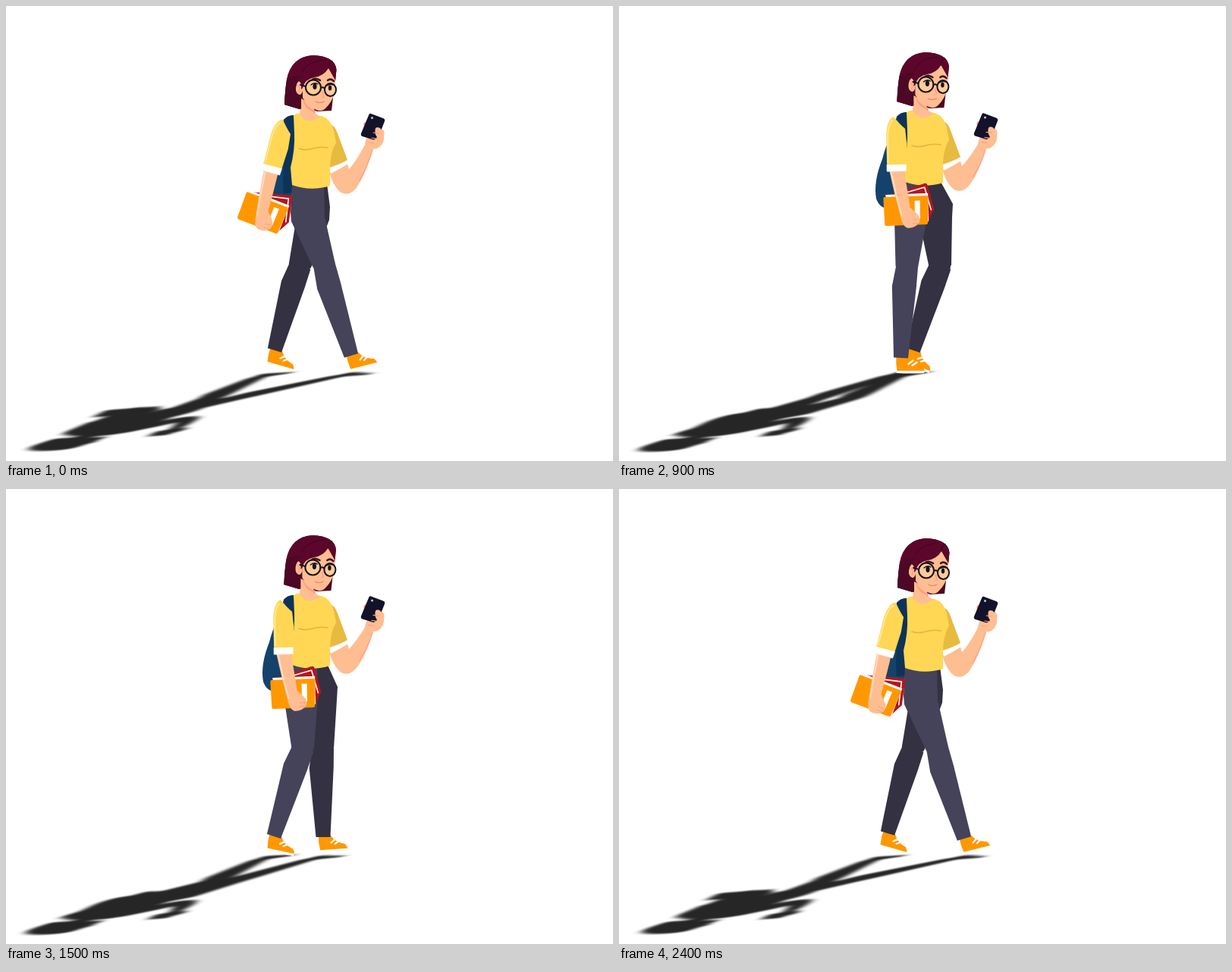
Recreate the animation shown at these times as an HTML page with a canvas. Size 800x600 px, loop 2500 ms.

```html
<!DOCTYPE html>
<html lang="en">
<head>
<meta charset="utf-8">
<title>Walking student</title>
<style>
html, body { margin: 0; width: 100%; height: 100%; overflow: hidden; background: #fff; }
canvas { display: block; }
</style>
</head>
<body>
<canvas id="stage" width="800" height="600"></canvas>
<script>
const stage = document.getElementById('stage').getContext('2d');
const layer = () => {
  const c = document.createElement('canvas');
  c.width = 800;
  c.height = 600;
  return c.getContext('2d');
};
const body = layer(), shade = layer();
const g = body;

const STEP = 100, FRAMES = 25, CYCLE = 2400;
const SKIN = '#ffbe91', BLUSH = '#ff9d85', SHIRT = '#ffd754', ORANGE = '#ff9800';
const NEAR = '#454359', FAR = '#343143', INK = '#17131d';

// time, hip x, knee x, knee y, ankle x, ankle y, foot tilt in degrees
const nearKeys = [
  [0, 399, 419, 342, 455, 461, -14],
  [500, 391, 396, 344, 403.5, 461, -1],
  [900, 386, 379, 344, 371.5, 464, 0],
  [1100, 380, 367, 346, 348.5, 464, 1],
  [1500, 390, 391, 342, 353, 458, 12],
  [1800, 394, 413, 341, 340, 428, 43],
  [2100, 400, 418, 342, 407.5, 462, 4],
  [2400, 399, 419, 342, 455, 461, -14]
];
const farKeys = [
  [0, 405, 387, 343, 354, 454, 16],
  [500, 417, 421, 340, 343.5, 425, 43],
  [900, 418, 423, 343, 387.5, 454, 22],
  [1100, 418, 425, 344, 429, 461, -12],
  [1200, 418, 425, 344, 440, 461, -13],
  [1500, 415, 417, 342, 418, 459, -4],
  [2100, 409, 389, 342, 376, 456, 10],
  [2400, 405, 387, 343, 354, 454, 16]
];

const rad = d => d * Math.PI / 180;
const mix = (a, b, k) => a + (b - a) * k;

function pose(keys, t) {
  let i = 1;
  while (keys[i][0] < t) i++;
  const a = keys[i - 1], b = keys[i];
  const k = (t - a[0]) / (b[0] - a[0]);
  return a.map((v, n) => mix(v, b[n], k)).slice(1);
}

function shape(color, d) {
  g.fillStyle = color;
  g.fill(new Path2D(d));
}

function line(color, width, d) {
  g.strokeStyle = color;
  g.lineWidth = width;
  g.stroke(new Path2D(d));
}

function oval(color, x, y, rx, ry, turn = 0) {
  g.fillStyle = color;
  g.beginPath();
  g.ellipse(x, y, rx, ry, turn, 0, 7);
  g.fill();
}

function group(x, y, deg, draw) {
  g.save();
  g.translate(x, y);
  g.rotate(rad(deg));
  draw();
  g.restore();
}

function shoe(x, y, tilt) {
  group(x, y, tilt, () => {
    shape('#fff', 'M-5 16H31V20Q14 21-6 20Z');
    shape(ORANGE, 'M-6-3L9-3L14 4Q20 9 28 11Q31 14 31 17L-5 17Q-7 7-6-3Z');
    line('#fff', 2.2, 'M10 8L16 3.5M15 10L21 6');
  });
}

function leg([hx, kx, ky, ax, ay, tilt], lift, color, near) {
  shoe(ax, ay, tilt);
  const hy = 250 - lift;
  // point along a limb, pushed sideways (positive is forward)
  const along = (x0, y0, x1, y1) => (k, w) => {
    const len = Math.hypot(x1 - x0, y1 - y0);
    const x = mix(x0, x1, k) + (y1 - y0) / len * w;
    const y = mix(y0, y1, k) - (x1 - x0) / len * w;
    return `${x} ${y}`;
  };
  const thigh = along(hx, hy, kx, ky), shin = along(kx, ky, ax, ay);
  const waist = near ? `M377 ${hy - 16}L${hx + 20} ${hy - 16}` : `M395 ${hy - 16}L423 ${hy - 16}`;
  const hip = near
    ? `L${hx + 21} ${hy + 28}`
    : `L${hx + 22} ${hy + 15}L${hx + 21} ${hy + 32}`;
  shape(color, `${waist}${hip}L${thigh(1, 15)}L${thigh(1, -14.5)}L${hx - 23} ${hy + 34}L${hx - 24} ${hy + 22}Z`);
  oval(color, kx, ky, 14, 14);
  shape(color, `M${shin(0, 15)}L${shin(0.22, 14.5)}L${shin(1, 9.5)}L${shin(1, -9.5)}L${shin(0.22, -17.5)}L${shin(0, -14)}Z`);
}

function bag() {
  shape('#15426a', 'M366 150Q371 144 379 144L384 170L381 205L379 246Q368 262 357 271Q344 272 339 258Q335 236 347 206Q351 190 357 178Z');
  shape('#0d3357', 'M366 150Q371 144 379 144L384 175L381 205L379 246L366 247Q362 215 374 170Z');
}

function phoneArm(lift) {
  const y = -lift, h = -lift * 0.15;
  shape(SKIN, `M427 ${215 + y}L449 ${205 + y}L452 ${215 + y}Q460 ${207 + y} 473 ${183 + h}L484 ${188 + h}Q474 ${222 + h} 461 ${241 + y}Q450 ${253 + y} 439 ${244 + y}Q430 ${234 + y} 427 ${222 + y}Z`);
  line(BLUSH, 1.2, `M483 ${190 + h}Q476 ${212 + h} 466 ${230 + y}`);
  g.save();
  g.translate(0, h);
  shape(BLUSH, 'M475 153Q470 152 472 160L478 166Z');
  shape(SKIN, 'M473 184Q473 175 480 169L488 160Q492 158 495 162Q500 164 498 172Q499 180 492 186Q484 192 473 184Z');
  shape('#12122a', 'M481 142L497 148Q500 149 499 152L490 175Q489 178 486 177L470 172Q467 171 468 168L478 144Q479 141 481 142Z');
  oval('#c9c9de', 482.5, 147.5, 1.5, 1.5);
  shape(SKIN, 'M487 161Q491 158 495 163Q499 165 498 173Q495 185 488 188Q478 188 477 179Q486 177 489 173Q485 168 487 161Z');
  line(BLUSH, 1.2, 'M478 180L485 181M482 174L489 175M484 167L491 168');
  g.restore();
}

function shirt() {
  shape('#fff', 'M425 212L448 202L451 208Q440 215 428 221Z');
  shape('#e7ba40', 'M424 155Q433 156 437 168L450 203Q440 209 426 213Z');
  shape(SHIRT, 'M379 144Q384 141 388 142L416 145Q428 149 432 164L435 180Q427 195 427 213L427 237Q402 245 377 236L375 213Q381 190 380 168Z');
  line('#e3b441', 1.6, 'M386 188Q394 191 404 188Q414 185 424 187');
  shape(SKIN, 'M389 122L387 143Q397 159 414 146L406 140L407 130Z');
  shape(BLUSH, 'M391 127Q397 137 408 139L407 142Q395 139 391 127Z');
}

function head() {
  shape('#4c0824', 'M404 65Q434 66 435.500 84L434 100L431 121L429 138L410 139L396 134L387 136L367 130Q368 108 370 97Q376 67 404 65Z');
  shape(SKIN, 'M389 122L389 143L405 143L407 132Z');
  shape(BLUSH, 'M391 122Q396 134 408 138L406 140Q394 137 391 122Z');
  shape(SKIN, 'M391 96L407 88L425 81L434 93L434 112Q430 126 422 134Q417 140 409 137Q397 132 391 121Z');
  oval(SKIN, 386, 108, 5, 9, -0.15);
  line(BLUSH, 1.2, 'M384 104Q389 107 386 114');
  shape('#5c062b', 'M404 65Q434 66 435.500 84L434 98L425 82Q419 92 407 94Q394 96 391 108L389 110Q390 101 386 99Q381 103 382 112L384 118L387 136L367 130Q368 108 370 97Q376 67 404 65Z');
  shape('#4c0824', 'M371 96Q379 92 390 92Q381 101 382 112L384 118L387 136L367 130Q368 108 371 96Z');
  line('#420720', 1.2, 'M391 86Q399 73 420 71M425 82Q424 76 430 73');
  // face
  line('#3b1220', 2.6, 'M404 97Q408 94 414 98M424 98Q428 95 432 99');
  oval('#ffcb98', 405, 108, 9.5, 9.5);
  oval('#ffcb98', 427.5, 110, 7, 8);
  oval(INK, 407, 106, 2.6, 4);
  oval(INK, 427, 108, 2.2, 3.6);
  line(INK, 1.4, 'M402 104Q406 100 411 103M423 105Q427 102 431 104');
  g.strokeStyle = INK;
  g.lineWidth = 2;
  g.beginPath();
  g.ellipse(405, 107.5, 10, 10, 0, 0, 7);
  g.moveTo(435, 110.500);
  g.ellipse(427.500, 110.500, 7.5, 8.5, 0, 0, 7);
  g.stroke();
  line(INK, 2, 'M388 104L395 106M415 108Q418 106 420 109');
  line(BLUSH, 1.3, 'M417 113L419 120L416 121');
  line('#ef7f6c', 1.2, 'M408 126Q413 129 419 126');
}

function books() {
  shape('#b5161d', 'M-21-32L27-45Q30-46 31-43L38-11L29 6L-18 0Z');
  line('#fff', 1.6, 'M-17-30L27-40L34-10');
  shape('#8d1018', 'M26-36L32-10L28 3Z');
  shape('#fff', 'M-25-33L31-32L30 5L-20 0Z');
  shape(ORANGE, 'M-26-30L29-29Q31-29 31-26L29 6Q29 9 26 9L-25 8Q-28 8-28 5L-28-28Q-28-30-26-30Z');
  shape('#fff', 'M13-23L20-23L19 1L12 1Z');
}

function bookArm(k) {
  const upper = mix(15, -6, k), fore = mix(12, -20, k), tilt = mix(20, -11, k);
  const x = 365 - 60 * Math.sin(rad(upper)), y = 160 + 60 * Math.cos(rad(upper));
  const hx = x - 2 - 68 * Math.sin(rad(fore)), hy = y + 66 * Math.cos(rad(fore));
  group(hx, hy, tilt, books);
  group(x, y, fore, () => {
    shape(SKIN, 'M-9.500-6L9.500-6Q9 25 7 52L14 62Q18 67 15 74Q7 81-2 78Q-8 74-7.500 62Q-9.500 32-9.500-6Z');
    line('#ffdcc0', 2, 'M-7.500 0Q-8 30-6 60');
    line(BLUSH, 1.1, 'M7 69L14 70M6 74L12 75');
  });
  group(365, 160, upper, () => {
    shape(SHIRT, 'M-12.500 56L-13 14Q-12-6-3-10Q5 0 12 6L14 26L12.500 57Z');
    line('#ffe795', 2, 'M-11 50L-11 14Q-10-1-5-5');
    shape('#fff', 'M-13 53L13 53L12.500 62L-13 62Z');
    line('#f3e6dc', 0.8, 'M-12 62L12 62');
  });
}

function figure(t) {
  const lift = 4 * (1 - Math.cos(t * Math.PI / 600));
  const swing = 1 - Math.abs(t - 1200) / 1200;
  const upper = (dx, draw) => {
    g.save();
    g.translate(dx, -lift);
    draw();
    g.restore();
  };
  g.clearRect(0, 0, 800, 600);
  g.lineCap = g.lineJoin = 'round';
  upper(0, bag);
  leg(pose(farKeys, t), lift, FAR, false);
  leg(pose(nearKeys, t), lift, NEAR, true);
  phoneArm(lift);
  upper(0, shirt);
  upper(-lift * 0.15, head);
  upper(0, () => bookArm(swing));
}

// The blur happens before the skew, so it smears along the ground.
function castShadow() {
  shade.globalCompositeOperation = 'copy';
  shade.filter = 'blur(4px)';
  shade.drawImage(body.canvas, 0, 0);
  shade.filter = 'none';
  shade.globalCompositeOperation = 'source-in';
  shade.fillStyle = '#262626';
  shade.fillRect(0, 0, 800, 600);
  stage.save();
  stage.transform(1, 0, 0.865, -0.25, -415, 603);
  stage.drawImage(shade.canvas, 0, 0);
  stage.restore();
}

function render(now) {
  const frame = Math.floor(now / STEP) % FRAMES;
  figure(frame * STEP % CYCLE);
  stage.fillStyle = '#fff';
  stage.fillRect(0, 0, 800, 600);
  castShadow();
  stage.drawImage(body.canvas, 0, 0);
}

function loop() {
  render(performance.now());
  requestAnimationFrame(loop);
}
loop();
</script>
</body>
</html>
```
